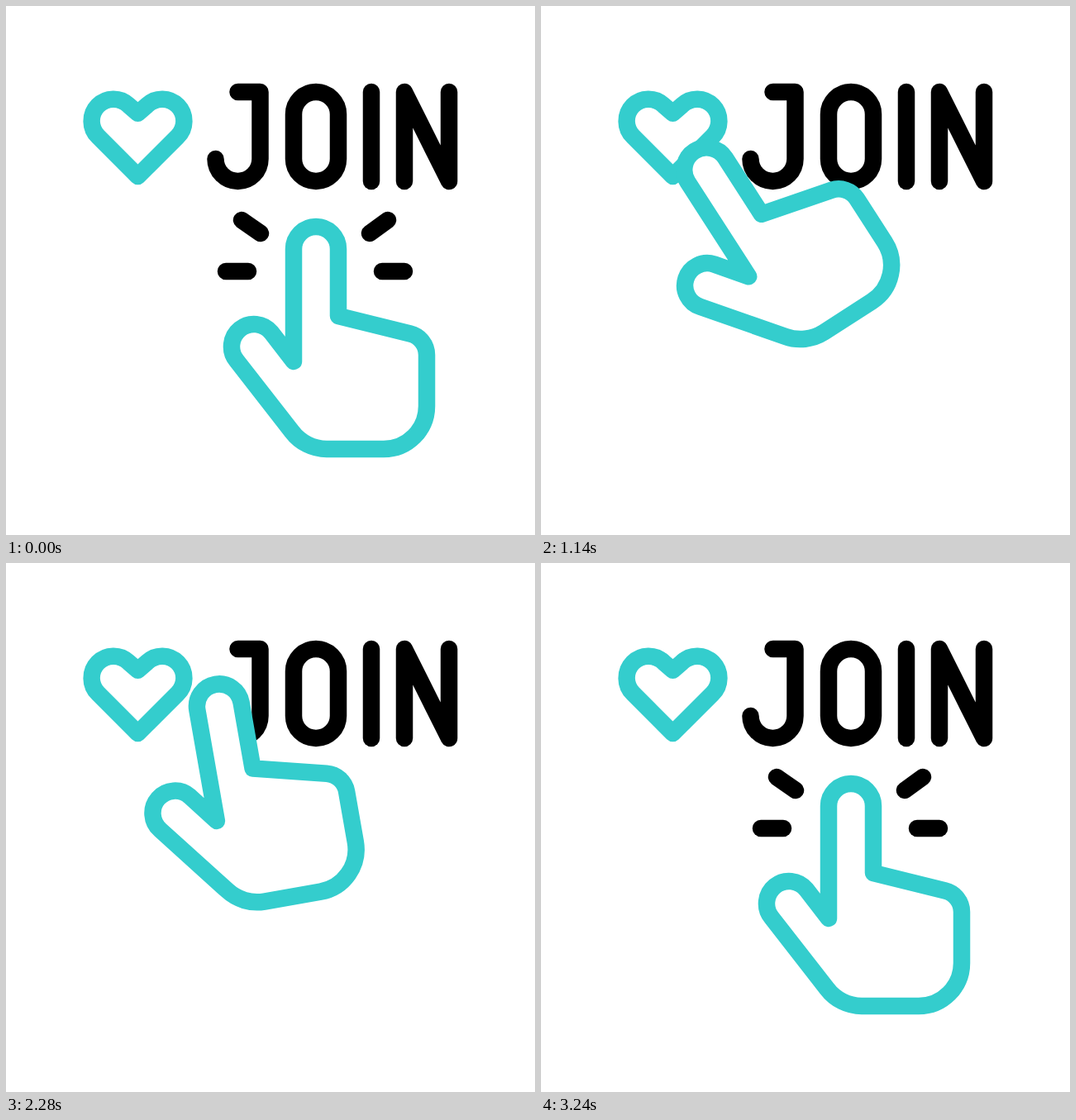
An HTML page for the animation above (3600 ms loop, 640x640 px).

```html
<!DOCTYPE html>
<html lang="en">
<head>
<meta charset="utf-8">
<title>Join</title>
<style>
  html, body { margin: 0; width: 100%; height: 100%; overflow: hidden; background: #fff; }
  svg { display: block; width: 100%; height: 100%; }
  path { fill: none; stroke: #000; stroke-width: 20.5; stroke-linecap: round; stroke-linejoin: round; }
  .teal { stroke: #34cdcd; }
  #palm { fill: #fff; }
</style>
</head>
<body>
<svg viewBox="0 0 640 640">
  <g id="word">
    <path d="M280.5 104H307.5V185A27 27 0 0 1 253.5 185"/>
    <path d="M348 131A27 27 0 0 1 402 131V185A27 27 0 0 1 348 185Z"/>
    <path d="M442 104V212"/>
    <path d="M482 212V104L536 212V104"/>
  </g>
  <path class="teal" id="heart" d="M159.5 206L111.6 158.1A26.4 26.4 0 0 1 148.5 120.2L159.5 129.8L170.5 120.2A26.4 26.4 0 0 1 207.4 158.1Z"/>
  <path id="sweep" pathLength="1"/>
  <g id="hand">
    <g id="rays">
      <path pathLength="1" d="M308 275L285 259"/>
      <path pathLength="1" d="M293 321H266"/>
      <path pathLength="1" d="M440 275L462 259"/>
      <path pathLength="1" d="M455 321H482"/>
    </g>
    <path class="teal" id="palm" d="M348 430V294A27 27 0 0 1 402 294V375L489 396.5A26.5 26.5 0 0 1 509 422V484A52 52 0 0 1 457 536H388A53 53 0 0 1 346 515L279 429A27 27 0 0 1 321 395Z"/>
  </g>
</svg>
<script>
const LOOP = 3600;
const $ = id => document.getElementById(id);
const letters = [...$('word').children];
const rays = [...$('rays').children];
$('sweep').setAttribute('d', $('heart').getAttribute('d'));

const unit = (t, a, b) => Math.min(1, Math.max(0, (t - a) / (b - a)));
const ease = (t, a, b) => (1 - Math.cos(Math.PI * unit(t, a, b))) / 2;

// Shows the part of a unit-length path from start to end
function trim(path, start, end) {
  const length = end - start;
  path.style.display = length > 0.002 ? '' : 'none';
  path.style.strokeDasharray = length >= 1 ? 'none' : `${length} 9`;
  path.style.strokeDashoffset = -start;
}

// Letters hop in turn, each starting at the peak of the one before
function drawWord(t) {
  letters.forEach((letter, i) => {
    const start = 1654 + 90 * i;
    const lift = 13 * Math.sin(Math.PI * unit(t, start, start + 180)) ** 2;
    letter.setAttribute('transform', `translate(0 ${-lift})`);
  });
}

// Rays grow outwards and then shrink, once at the heart and once at rest
function drawRays(t) {
  let start = ease(t, 1780, 2000), end = ease(t, 1600, 1780);
  if (t < 1000) [start, end] = [ease(t, 20, 570), 1];
  if (t > 2400) [start, end] = [0, ease(t, 2940, 3200)];
  rays.forEach(ray => trim(ray, start, end));
}

// Wind up, lunge to the heart, settle, return
function drawHand(t) {
  const windUp = ease(t, 0, 580), lunge = ease(t, 575, 1290), settle = ease(t, 1500, 1940);
  const x = 51 * windUp - 190 * lunge + 11 * settle + 128 * ease(t, 2040, 2800);
  const y = 49 * windUp - 190 * lunge + 7.5 * settle + 133.5 * ease(t, 2180, 2800);
  const turn = 4 * ease(t, 0, 380) - 36.8 * ease(t, 380, 1000) + 4.4 * settle
    + 33.8 * ease(t, 1990, 2540) - 5.4 * ease(t, 2680, 2980);
  $('hand').setAttribute('transform', `translate(${x} ${y}) rotate(${turn} 391 401)`);
}

const begin = performance.now();
function tick() {
  const t = (performance.now() - begin) % LOOP;
  drawWord(t);
  trim($('sweep'), ease(t, 1800, 2040), ease(t, 1620, 1830));
  drawRays(t);
  drawHand(t);
  requestAnimationFrame(tick);
}
tick();
</script>
</body>
</html>
```
